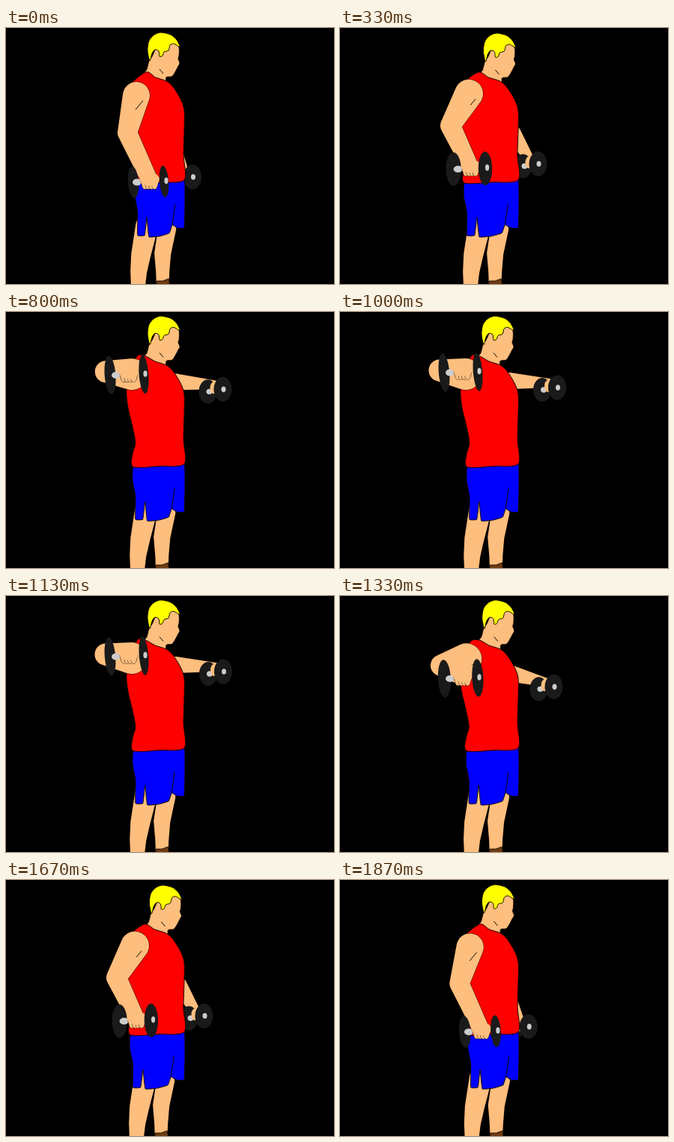
Write an HTML page with a canvas that moves like this. It is 438 px wide and 342 px high and loops after 1940 ms.

```html
<!DOCTYPE html>
<html lang="en">
<head>
<meta charset="utf-8">
<title>Dumbbell raise</title>
<style>
html, body { margin: 0; width: 100%; height: 100%; overflow: hidden; background: #000; }
canvas { display: block; }
</style>
</head>
<body>
<canvas id="stage" width="438" height="342"></canvas>
<script>
const ctx = document.getElementById('stage').getContext('2d');
const LOOP = 1940, STEPS = 29, TOP = 15;
const SKIN = '#fdbe7e', IRON = '#1a1a1a', STEEL = '#ccc';

// Joint positions with the arms down, low, half way and raised.
const joints = {
  elbow: [[162, 140], [147, 130], [139, 117], [133, 78]],
  hand: [[192, 204], [174, 186], [164, 157], [164, 79]],
  farElbow: [[226, 170], [231, 140], [234, 123], [226, 92]],
  farHand: [[238, 199], [254, 181], [267, 155], [279, 101]],
  head: [[0, 0], [2.5, 1], [2, -.5], [0, -.5]],
  hip: [[4], [-3], [-1], [1]]
};

const head = [[195, 38], [205, 20], [225, 18], [231, 26], [231, 37], [230, 41], [232, 47], [230, 51], [228, 55],
  [224, 62], [221, 65], [214, 66], [213, 75], [200, 74], [184, 63], [188, 55], [191, 44]];
const hair = [[232, 25], [224, 21], [219, 23], [217, 30], [211, 32], [209, 37], [205, 38], [204, 31], [199, 29],
  [195, 34], [192, 44], [189, 30], [191, 17], [198, 9], [207, 6], [220, 9], [228, 16]];
const shirt = [[186, 59], [199, 66], [214, 71], [223, 79], [233, 95], [238, 110], [238, 136], [237, 170], [238, 203],
  [205, 206], [169, 207], [168, 190], [172, 175], [168, 152], [162, 126], [161, 100]];
const shorts = [[169, 207], [205, 206], [238, 202], [239, 235], [238, 267], [228, 267], [221, 263], [217, 274],
  [204, 278], [188, 279], [185, 253], [182, 277], [172, 277], [172, 246], [168, 225]];

// Rises with a soft start and stop, then falls the same way.
function poseAt(step) {
  const u = Math.min(1, (TOP - Math.abs(step - TOP)) / (TOP - 2));
  return 1.5 * (1 - Math.cos(Math.PI * u));
}

function mix(keys, pose) {
  const i = Math.min(2, Math.floor(pose)), f = pose - i;
  return keys[i].map((v, n) => v + (keys[i + 1][n] - v) * f);
}

// Closed curve through the points; bend 0 gives straight sides.
function shape(pts, fill, bend = .14) {
  const n = pts.length, at = i => pts[(i + n) % n];
  ctx.beginPath();
  ctx.moveTo(...pts[0]);
  for (let i = 0; i < n; i++) {
    const [a, b, c, d] = [at(i - 1), at(i), at(i + 1), at(i + 2)];
    ctx.bezierCurveTo(
      b[0] + (c[0] - a[0]) * bend, b[1] + (c[1] - a[1]) * bend,
      c[0] - (d[0] - b[0]) * bend, c[1] - (d[1] - b[1]) * bend, ...c);
  }
  ctx.fillStyle = fill;
  ctx.fill();
  ctx.stroke();
}

// Outlined skin over a chain of circles [x, y, radius], tapering from each to the next.
function limb(...chain) {
  const path = new Path2D();
  for (let i = 1; i < chain.length; i++) {
    const [x0, y0, r0] = chain[i - 1], [x1, y1, r1] = chain[i];
    const a = Math.atan2(y1 - y0, x1 - x0);
    const b = Math.acos((r0 - r1) / Math.hypot(x1 - x0, y1 - y0));
    const part = new Path2D();
    part.arc(x0, y0, r0, a + b, a - b + 2 * Math.PI);
    part.arc(x1, y1, r1, a - b, a + b);
    part.closePath();
    path.addPath(part);
  }
  ctx.stroke(path);
  ctx.fillStyle = SKIN;
  ctx.fill(path);
}

function line(x0, y0, x1, y1) {
  ctx.beginPath();
  ctx.moveTo(x0, y0);
  ctx.lineTo(x1, y1);
  ctx.stroke();
}

function oval(x, y, rx, ry, fill, tilt = 0) {
  ctx.beginPath();
  ctx.ellipse(x, y, rx, ry, tilt, 0, 7);
  ctx.fillStyle = fill;
  ctx.fill();
}

function shifted(dx, dy, draw) {
  ctx.save();
  ctx.translate(dx, dy);
  draw();
  ctx.restore();
}

function farArm([ex, ey], [x, y]) {
  limb([ex, ey, 11], [x, y - 6, 6]);
  oval(x - 9, y + 3, 12, 16, IRON);
  oval(x - 7, y + 3, 4, 3.7, STEEL);
  oval(x - 1, y - 2, 5, 8, SKIN);
  oval(x + 11, y, 12, 16.5, IRON);
  oval(x + 12, y, 3, 3.8, STEEL);
}

function nearArm(pose, [ex, ey], [x, y]) {
  const sx = 174 - 2 * pose, sy = 90 - 2.3 * pose, low = 1 - pose / 3;
  limb([sx, sy, 18 + pose], [ex, ey, 13 + pose / 2], [x, y, 11]);
  line(sx + 9, sy + 7, sx + 9 - 10 * low, sy + 7 + 12 * low);

  // The plates look widest half way up, when the bar turns to the side.
  const turn = Math.sin(Math.PI * low);
  const wide = 6.2 + 3.5 * turn, tall = 21 + 1.6 * pose, tilt = -.08 * (1 - turn);
  oval(x - 22 - pose, y + 2, wide + 1, tall, IRON, tilt);
  oval(x - 17, y + 2, 6, 4.5, STEEL);
  for (let dx = -8; dx <= 8; dx += 5.3) limb([x + dx, y, 4], [x + dx * .8, y + 8, 3.2]);
  oval(x, y - 2, 13, 9, SKIN);
  oval(x + 19 + pose / 3, y + 1, wide, tall, IRON, tilt);
  oval(x + 22, y, 2.6, 4.2, STEEL);
}

function draw(pose) {
  const at = Object.fromEntries(Object.entries(joints).map(([name, keys]) => [name, mix(keys, pose)]));
  const [hip] = at.hip;
  // The back of the body sways while the front stays in place.
  const sway = pts => pts.map(([x, y]) => [x + hip * (239 - x) / 71 * Math.min(1, y / 200), y]);

  ctx.fillStyle = '#000';
  ctx.fillRect(0, 0, 438, 342);
  ctx.strokeStyle = '#160800';
  ctx.lineWidth = 1;

  farArm(at.farElbow, at.farHand);

  shifted(hip * .3 - 1, 0, () => {
    limb([215, 268, 12], [209, 301, 11], [209, 325, 9], [209, 350, 8]);
    shape([[201, 338], [209, 338], [217, 335], [219, 346], [200, 346]], '#6e3c12', 0);
    limb([188, 264, 15], [180, 303, 13], [177, 325, 11], [176, 350, 9]);
  });

  shifted(...at.head, () => {
    shape(head, SKIN);
    shape(hair, '#ff0');
    line(205, 55, 210, 61);
  });

  const cloth = sway(shorts), [cx, cy] = cloth[6];
  shape(cloth, '#00f', .04);
  line(cx, cy, cx + 4, cy - 28);
  shape([...sway(shirt), [164 + 3.5 * pose, 78 - 6 * pose]], '#f00');

  nearArm(pose, at.elbow, at.hand);
}

const start = performance.now();
function tick() {
  const t = (performance.now() - start) % LOOP;
  draw(poseAt(Math.floor(t / LOOP * STEPS + .15)));
  requestAnimationFrame(tick);
}
tick();
</script>
</body>
</html>
```
